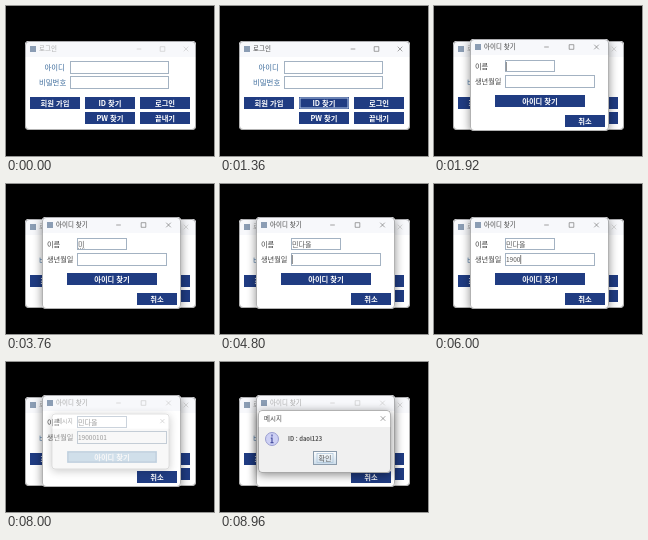
Write an HTML page that moves like this. It is 208 px wide and 150 px high and loops after 9.44 s.

```html
<!DOCTYPE html>
<html lang="ko">
<head>
<meta charset="utf-8">
<title>로그인</title>
<style>
  html, body { margin: 0; width: 100%; height: 100%; overflow: hidden; background: #000; }
  svg { display: block; width: 208px; height: 150px; }
  text { font: 6.5px "Noto Sans CJK KR", "Noto Sans CJK", "Noto Sans", sans-serif; fill: #555; white-space: pre; }
  .window { filter: drop-shadow(0 2px 5px rgba(0, 0, 0, .45)); transform-box: fill-box; transform-origin: center; }
  .edge { fill: none; stroke: #000; stroke-opacity: .3; }
  .title { font-size: 6.5px; fill: #444; }
  .controls { fill: none; stroke: #666; stroke-width: .6; }
  .inactive .title { fill: #aaa; }
  .inactive .controls { stroke: #c4c4c4; }
  .label { font-size: 7.2px; fill: #444; }
  .blue { font-size: 7.4px; font-weight: 500; fill: #3d6c9c; }
  .field { fill: #fff; stroke: #a3b2c2; stroke-width: 1; }
  .button rect { fill: #203c82; }
  .button text { font-size: 7.3px; font-weight: 700; fill: #fff; text-anchor: middle; }
  .button .rim { fill: none; stroke: none; }
  .hover .rim { stroke: #b3c8e6; stroke-width: 1; }
  .pressed .face { fill: #b8d2e6; }
  .pressed .rim { stroke: #8ea9c0; stroke-width: .8; }
  .message { font-size: 5.8px; font-weight: 600; }
  .ok { font-size: 7px; font-weight: 500; text-anchor: middle; }
  #name { font-size: 7px; }
</style>
</head>
<body>
<svg id="stage" viewBox="0 0 208 150"></svg>
<script>
const LOOP = 9440, STEP = 80, BLINK = 500;
const NAME = "민다올", USER_ID = "daol123", BIRTH = "19000101";

// Each entry is [time in ms, value from then on].
const nameKeys = [
  [0, ""], [3520, "ㅁ"], [3680, "미"], [3840, "민"], [4000, "민ㄷ"],
  [4160, "민다"], [4240, "민당"], [4400, "민다오"], [4560, NAME]
];
const birthKeys = [
  [0, 0], [5280, 1], [5440, 2], [5680, 3], [5840, 4],
  [6400, 5], [6560, 6], [6720, 7], [6800, 8]
];
const caretResets = [[0, 0], [1760, 1660], [4800, 4800], ...birthKeys.slice(1).map(([t]) => [t, t])];

const label = (x, y, text, cls = "") => `<text class="label ${cls}" x="${x}" y="${y}">${text}</text>`;
const field = (x, y, w, h) => `<rect class="field" x="${x + .5}" y="${y + .5}" width="${w - 1}" height="${h - 1}"/>`;

function button(x, y, w, text, id = "") {
  return `<g class="button" id="${id}">
    <rect class="face" x="${x}" y="${y}" width="${w}" height="12"/>
    <rect class="rim" x="${x + 1}" y="${y + 1}" width="${w - 2}" height="10"/>
    <text x="${x + w / 2}" y="${y + 8.7}">${text}</text></g>`;
}

function controls(x, y, gap) {
  const cross = `M${x - 2.3} ${y - 2.3}l4.6 4.6m0 -4.6l-4.6 4.6`;
  const resize = gap ? `M${x - gap - 2.3} ${y - 2.3}h4.6v4.6h-4.6zM${x - 2 * gap - 2.3} ${y}h4.6` : "";
  return `<path class="controls" d="${cross}${resize}"/>`;
}

function frame({ id, x, y, w, h, title, closeX, gap, icon, bar = 16, barFill = "#f7f8fb", fill = "#fff" }, content) {
  const titleY = y + bar / 2;
  return `<g class="window" id="${id}">
    <rect x="${x}" y="${y}" width="${w}" height="${h}" rx="4" fill="${fill}"/>
    <path d="M${x} ${y + bar}v${4 - bar}q0 -4 4 -4h${w - 8}q4 0 4 4v${bar - 4}z" fill="${barFill}"/>
    <rect class="edge" x="${x + .5}" y="${y + .5}" width="${w - 1}" height="${h - 1}" rx="3.5"/>
    ${icon ? `<rect x="${x + 5}" y="${titleY - 3}" width="6" height="6" fill="#8b9db4"/>` : ""}
    <text class="title" x="${x + (icon ? 14 : 6)}" y="${titleY + 2.4}">${title}</text>
    ${controls(closeX, titleY, gap)}
    <g class="content">${content}</g></g>`;
}

const login = frame(
  { id: "login", x: 19, y: 35, w: 171, h: 89, title: "로그인", closeX: 180, gap: 23.5, icon: true },
  label(38.5, 64, "아이디", "blue") + label(33, 79, "비밀번호", "blue") +
  field(64, 55, 99, 13) + field(64, 70, 99, 13) +
  button(24, 91, 50, "회원 가입") + button(79, 91, 50, "ID 찾기", "findId") +
  button(134, 91, 50, "로그인") + button(79, 106, 50, "PW 찾기") + button(134, 106, 50, "끝내기")
);

const finder = frame(
  { id: "finder", x: 36, y: 33, w: 139, h: 92, title: "아이디 찾기", closeX: 162.5, gap: 25, icon: true },
  label(41, 62.7, "이름") + label(41, 77.7, "생년월일") +
  field(71, 54, 50, 12) + field(71, 69, 90, 13) +
  `<text id="name" x="72" y="62.8"></text><text id="birth" x="72" y="77.5"></text>
   <path id="composing" stroke="#777" stroke-width=".7" stroke-dasharray="1 1"/>
   <path id="caret" stroke="#444" stroke-width=".7"/>` +
  button(61, 89, 90, "아이디 찾기", "search") + button(131, 109, 40, "취소")
);

const dialog = frame(
  { id: "dialog", x: 38, y: 48, w: 133, h: 63, title: "메시지", closeX: 163, bar: 17, barFill: "#fff", fill: "#f0f0f0" },
  `<circle cx="52" cy="77" r="6.5" fill="#cdd0f4" stroke="#9a9ed0"/>
   <path d="M52 72.5v2M50.8 76.2h1.2v4.4m-1.5 0h3" fill="none" stroke="#4a50a0" stroke-width="1.2"/>
   <text class="message" x="68" y="79.3">ID : ${USER_ID}</text>
   <linearGradient id="sheen" x2="0" y2="1"><stop stop-color="#fff"/><stop offset="1" stop-color="#cbdcea"/></linearGradient>
   <rect x="93.5" y="89.5" width="23" height="13" fill="url(#sheen)" stroke="#8b9bab"/>
   <rect x="97" y="91.5" width="16" height="9" fill="none" stroke="#aac2d8" stroke-width=".7"/>
   <text class="ok" x="105" y="98.6">확인</text>`
);

document.getElementById("stage").innerHTML = login + finder + dialog;
const el = id => document.getElementById(id);
const during = (t, from, to) => t >= from && t < to;
const valueAt = (keys, t) => keys.reduce((value, [at, next]) => t >= at ? next : value, keys[0][1]);

// A window grows and fades in; its content is painted once it is mostly open.
function open(id, t, start) {
  const p = Math.min(1, Math.max(0, (t - start) / 160));
  const eased = 1 - (1 - p) ** 2;
  const group = el(id);
  group.style.display = p > 0 ? "" : "none";
  group.style.opacity = eased;
  group.style.transform = `scale(${.8 + .2 * eased})`;
  group.querySelector(".content").style.display = p > .5 ? "" : "none";
}

function draw(t) {
  open("finder", t, 1720);
  open("dialog", t, 7960);

  el("login").classList.toggle("inactive", !during(t, 800, 1760));
  el("finder").classList.toggle("inactive", t >= 7960);
  el("findId").classList.toggle("hover", during(t, 1200, 1760));
  el("findId").classList.toggle("pressed", during(t, 1600, 1680));
  el("search").classList.toggle("hover", t >= 7600);
  el("search").classList.toggle("pressed", during(t, 7760, 8160));

  const name = valueAt(nameKeys, t);
  const birth = BIRTH.slice(0, valueAt(birthKeys, t));
  el("name").textContent = name;
  el("birth").textContent = birth;

  const end = 72 + name.length * 6.4;
  const composing = during(t, 3520, 4640);
  el("composing").setAttribute("d", composing ? `M${end - 6.4} 64.4h6.4` : "");

  const inBirth = t >= 4800;
  const caretX = inBirth ? 72.3 + birth.length * 3.6 : end + .3;
  const blinkOn = Math.floor((t - valueAt(caretResets, t)) / BLINK) % 2 === 0;
  const visible = t < 7760 && !composing && blinkOn;
  el("caret").setAttribute("d", visible ? `M${caretX} ${inBirth ? 71 : 56}v9` : "");
}

function tick(now) {
  draw(Math.floor(now % LOOP / STEP) * STEP);
  requestAnimationFrame(tick);
}
requestAnimationFrame(tick);
</script>
</body>
</html>
```
